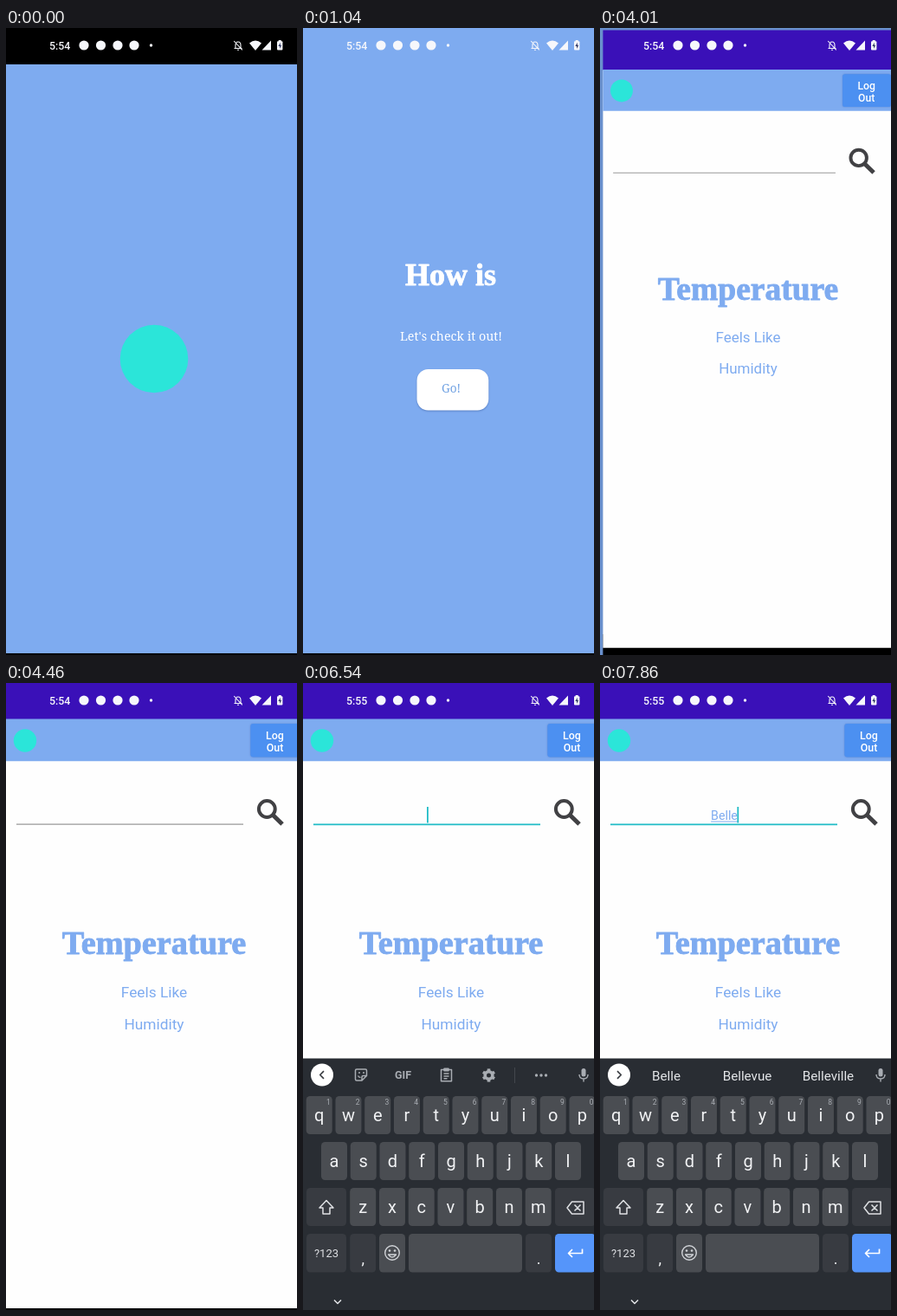
An HTML page with a canvas for the animation above (8000 ms loop, 336 by 724 pixels).

```html
<!DOCTYPE html>
<html lang="en">
<head>
<meta charset="utf-8">
<title>Weather app</title>
<style>
html, body { margin: 0; width: 100%; height: 100%; overflow: hidden; background: #000; }
canvas { display: block; width: 336px; height: 724px; }
</style>
</head>
<body>
<canvas id="stage"></canvas>
<script>
const W = 336, H = 724, MID = 171, LOOP = 8000, STEP = 148.5;
const BLUE = '#7eabf0', TEAL = '#2be5d9', FOCUS = '#20bcc6', PURPLE = '#3a10b8';
const SANS = 'Roboto, sans-serif', SERIF = '"Noto Serif", serif';
const FAT = '"Liberation Serif", serif';

const canvas = document.getElementById('stage');
const c = canvas.getContext('2d');
const dpr = window.devicePixelRatio || 1;
canvas.width = W * dpr;
canvas.height = H * dpr;

const clamp = (v, lo, hi) => Math.max(lo, Math.min(hi, v));

function rect(x, y, w, h, fill, r = 0) {
  c.fillStyle = fill;
  c.beginPath();
  c.roundRect(x, y, w, h, r);
  c.fill();
}

function disc(x, y, r, fill) {
  c.fillStyle = fill;
  c.beginPath();
  c.arc(x, y, r, 0, Math.PI * 2);
  c.fill();
}

function ring(x, y, r, color, width) {
  c.strokeStyle = color;
  c.lineWidth = width;
  c.beginPath();
  c.arc(x, y, r, 0, Math.PI * 2);
  c.stroke();
}

function line(d, color, width, x = 0, y = 0) {
  c.save();
  c.translate(x, y);
  c.strokeStyle = color;
  c.lineWidth = width;
  c.stroke(new Path2D(d));
  c.restore();
}

function shape(d, color) {
  c.fillStyle = color;
  c.fill(new Path2D(d));
}

function text(str, x, y, font, color, align = 'center') {
  c.font = font;
  c.fillStyle = color;
  c.textAlign = align;
  c.fillText(str, x, y);
}

// Heavy display type
function title(str, x, y, size, color) {
  text(str, x, y, `bold ${size}px ${FAT}`, color);
  c.strokeStyle = color;
  c.lineWidth = 0.9;
  c.lineJoin = 'round';
  c.strokeText(str, x, y);
}

function statusIcons(clock) {
  const white = '#f6f7fb';
  text(clock, 50, 24.8, `500 12.4px ${SANS}`, white, 'left');
  for (const x of [90, 109.5, 129, 148]) disc(x, 20, 5.6, white);
  disc(167.5, 20, 1.7, white);
  line('M-3 3.5V0Q-3-4 0-4Q3-4 3 0V3.5M-4.5 3.5H4.5M-1 5.3H1M-4.8-5L4.8 5.3', white, 1.1, 268, 20);
  shape('M281 17.6Q288 11.6 295 17.6L288 26Z', white);
  shape('M306 14.5V25.5H295.5Z', white);
  rect(313, 15.2, 6.4, 10.4, white, 1);
  rect(314.7, 14, 3, 2, white);
  shape('M316.7 16.8L314.4 21H316V24L318.2 19.8H316.7Z', '#333a66');
}

function splash() {
  rect(0, 0, W, H, BLUE);
  rect(0, 0, W, 42, '#000');
  disc(MID, 382, 39.3, TEAL);
}

function home(chars) {
  rect(0, 0, W, H, BLUE);
  title('How is Today?!'.slice(0, chars).trim(), 170.5, 297, 36, '#fff');
  text("Let's check it out!", MID, 361, `14.3px ${SERIF}`, '#fff');
  c.save();
  c.shadowColor = 'rgba(20,50,110,.35)';
  c.shadowBlur = 2 * dpr;
  c.shadowOffsetY = dpr;
  rect(131.5, 394, 82.8, 47.6, '#fff', 13);
  c.restore();
  text('Go!', MID, 420.5, `500 13.6px ${SERIF}`, '#72a3e3');
}

function field(focused, typed, cursor) {
  if (!focused) {
    rect(12, 162.6, 262, 1.1, '#999');
    return;
  }
  rect(12, 162.4, 262, 1.8, FOCUS);
  let x = 143;
  if (typed) {
    text(typed, 143.5, 158, `14.2px ${SANS}`, BLUE);
    const w = c.measureText(typed).width;
    rect(143.5 - w / 2, 159.5, w, 1, BLUE);
    x = 143.5 + w / 2 - 0.5;
  }
  if (cursor) rect(x, 143, 1.8, 18.5, FOCUS);
}

// Reaches a little past the top so it still covers when scaled down
function mainPage(focused, typed, cursor) {
  rect(0, 42, 342, 681, '#fefefe');
  rect(0, -5, 342, 47, PURPLE);
  rect(0, 41.5, 342, 48.8, BLUE);
  disc(22, 66.5, 13.2, TEAL);
  c.save();
  c.shadowColor = 'rgba(30,60,140,.35)';
  c.shadowBlur = 2 * dpr;
  rect(282.3, 47, 57, 38.5, '#4c90f1', 3);
  c.restore();
  text('Log', 310.5, 64.5, `500 12.4px ${SANS}`, '#fff');
  text('Out', 310.5, 78.8, `500 12.4px ${SANS}`, '#fff');

  field(focused, typed, cursor);
  ring(301.3, 145.5, 9.4, '#414144', 4);
  line('M308 152.2L319 163', '#414144', 5);

  title('Temperature', MID, 312.5, 38.3, BLUE);
  text('Feels Like', MID, 363.3, `17.3px ${SANS}`, BLUE);
  text('Humidity', MID, 399.6, `17.3px ${SANS}`, BLUE);
}

const KEY = '#4a4d52', DARK = '#383b41', INK = '#f1f2f4', DIM = '#a9adb3';
const PITCH = 33.75;

function keyRow(letters, x, y, hints) {
  [...letters].forEach((ch, i) => {
    const mid = x + i * PITCH;
    rect(mid - 15, y, 30, 44, KEY, 4.5);
    text(ch, mid, y + 28.5, `20px ${SANS}`, INK);
    if (hints) text((i + 1) % 10, mid + 10.8, y + 9.5, `8.5px ${SANS}`, DIM);
  });
}

function mic() {
  rect(321.5, 445, 5, 9.5, DIM, 2.5);
  line('M-5 0Q-5 5 0 5Q5 5 5 0M0 5V8.5', DIM, 1.4, 324, 452);
}

function toolbar(suggesting) {
  disc(22, 452.5, 13, '#fff');
  line(suggesting ? 'M-2-4.3L2.3 0L-2 4.3' : 'M2-4.3L-2.3 0L2 4.3', '#3b3e43', 1.7, 22, 452.5);
  mic();
  if (suggesting) {
    const words = { Belle: 76.5, Bellevue: 170, Belleville: 263.5 };
    for (const w in words) text(w, words[w], 458.5, `15.2px ${SANS}`, '#e4e6e9');
    return;
  }
  // sticker
  line('M1 6.5H-5Q-6.5 6.5-6.5 5V-5Q-6.5-6.5-5-6.5H5Q6.5-6.5 6.5-5V1L1 6.5V2.5Q1 1 2.5 1H6.5M-3-2.5H-1M2-2.5H4M-3.5 1Q-2.5 3-.5 3', DIM, 1.5, 67, 452.5);
  text('GIF', 115.5, 457, `bold 12.5px ${SANS}`, DIM);
  // clipboard
  line('M-6-6H6V7.3H-6ZM-3-1.5H3M-3 1.5H3M-3 4.3H1', DIM, 1.5, 165.5, 452.5);
  rect(162.2, 444.6, 6.6, 4, DIM, 1);
  // gear
  ring(214.5, 453, 4.3, DIM, 3.6);
  for (let i = 0; i < 6; i++) {
    const a = i * Math.PI / 3 + Math.PI / 6;
    line(`M${5 * Math.cos(a)} ${5 * Math.sin(a)}L${7.6 * Math.cos(a)} ${7.6 * Math.sin(a)}`, DIM, 3.6, 214.5, 453);
  }
  rect(244, 444, 1, 18, '#43474d');
  for (const dx of [-5.5, 0, 5.5]) disc(275 + dx, 453, 1.7, DIM);
}

function keyboard(suggesting) {
  rect(0, 433.5, W, 291, '#292d33');
  toolbar(suggesting);
  keyRow('qwertyuiop', 18.7, 477, true);
  keyRow('asdfghjkl', 36, 530);
  keyRow('zxcvbnm', 69.2, 583);

  rect(4, 583, 46, 44, DARK, 4.5);
  line('M0-8L8 .5H4V7.5H-4V.5H-8Z', '#dfe1e4', 1.5, 27, 605.5);
  rect(291, 583, 47, 44, DARK, 4.5);
  line('M-10 0L-4.5-7H9V7H-4.5ZM-1.5-3.5L5.5 3.5M5.5-3.5L-1.5 3.5', '#dfe1e4', 1.5, 315, 606);

  rect(4, 636, 46, 44.5, DARK, 4.5);
  text('?123', 27, 663, `13px ${SANS}`, '#dfe1e4');
  rect(54.2, 636, 30, 44.5, DARK, 4.5);
  text(',', 69.2, 671, `18px ${SANS}`, INK);
  rect(88, 636, 30, 44.5, KEY, 4.5);
  ring(103, 658, 8.3, '#d0d3d7', 1.4);
  disc(100, 655.5, 1.3, '#d0d3d7');
  disc(106, 655.5, 1.3, '#d0d3d7');
  line('M-4.5 0Q0 6 4.5 0Z', '#d0d3d7', 1.3, 103, 660);
  rect(122, 636, 131, 44.5, KEY, 4.5);
  rect(257, 636, 30, 44.5, DARK, 4.5);
  text('.', 272, 671, `18px ${SANS}`, INK);
  rect(291, 636, 47, 44.5, '#5595fa', 4.5);
  line('M8-5V0H-8M-3.5-4.5L-8 0L-3.5 4.5', '#fff', 1.7, 314.5, 658.5);
  line('M-4-2L0 2L4-2', '#e4e6e9', 1.5, 40, 714.5);
}

function draw(t) {
  // The screen refreshes on a coarse, even beat
  const k = Math.floor(t / STEP + 0.1);
  c.setTransform(dpr, 0, 0, dpr, 0, 0);
  c.globalAlpha = 1;

  if (k < 27) {
    const chars = clamp(Math.floor((k * STEP - 220) / 130), 0, 14);
    splash();
    if (k > 0) {
      c.globalAlpha = [0, 0.4, 0.85][k] ?? 1;
      home(chars);
      c.globalAlpha = 1;
    }
  } else {
    const s = [0.98, 0.993, 0.998][k - 27] ?? 1;
    const typed = 'Belle'.slice(0, clamp(Math.floor((k - 47) / 1.5) + 1, 0, 5));
    const left = MID * (1 - s);
    rect(0, 0, W, H, '#6990cd');
    rect(left, 700, W, 24, '#000');
    c.save();
    c.translate(MID, 365);
    c.scale(s, s);
    c.translate(-MID, -365);
    mainPage(k >= 42, typed, k !== 46);
    c.restore();
  }
  if (k < 27 || k >= 30) rect(0, 722, W, 2, '#08090c');

  if (k >= 43) {
    c.save();
    c.translate(0, k === 43 ? 110 : 0);
    keyboard(k >= 47);
    c.restore();
  }
  statusIcons(k < 36 ? '5:54' : '5:55');
}

const start = performance.now();
function tick() {
  draw((performance.now() - start) % LOOP);
  requestAnimationFrame(tick);
}
tick();
</script>
</body>
</html>
```
